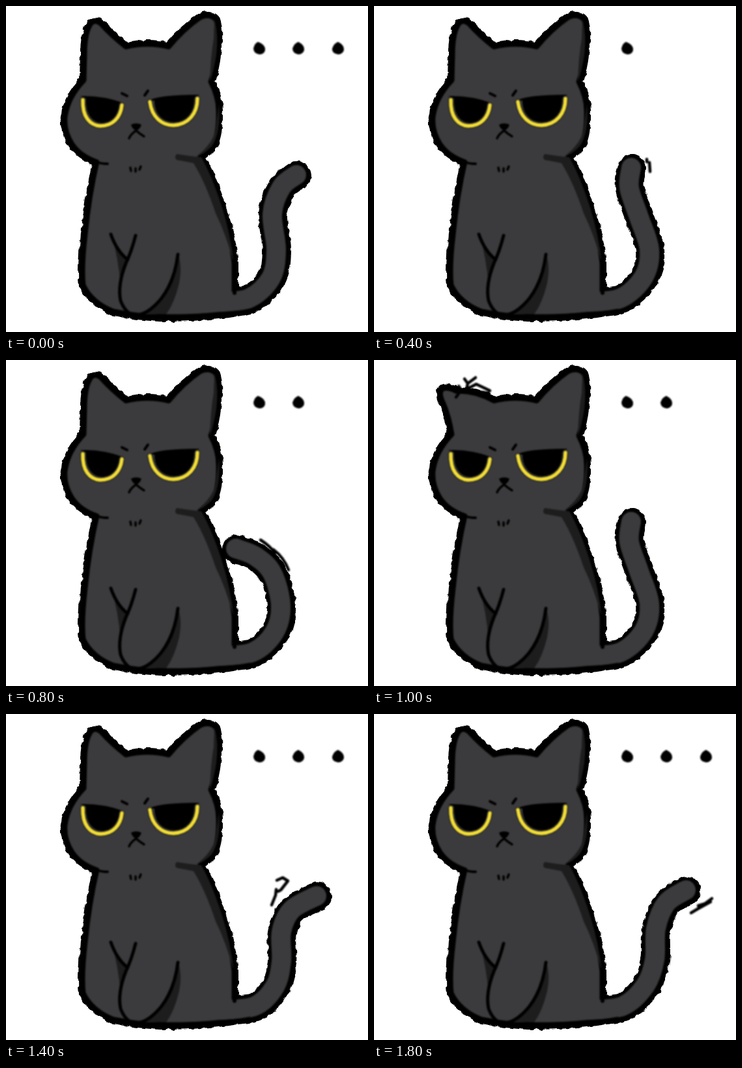
An HTML page for the animation above (2000 ms loop, 556x500 px).

```html
<!DOCTYPE html>
<html lang="en">
<head>
<meta charset="utf-8">
<title>Grumpy cat</title>
<style>
html, body { margin: 0; width: 100%; height: 100%; overflow: hidden; background: #fff; }
svg { display: block; width: 100vw; height: 100vh; }
.line { fill: none; stroke: #000; stroke-linecap: round; stroke-linejoin: round; }
.shade { fill: #1d1d1e; }
</style>
</head>
<body>
<svg viewBox="0 0 556 500">
  <defs>
    <filter id="rough" filterUnits="userSpaceOnUse" x="0" y="0" width="556" height="500" color-interpolation-filters="sRGB">
      <feTurbulence type="fractalNoise" baseFrequency=".13" numOctaves="1" seed="4"/>
      <feDisplacementMap in="SourceGraphic" scale="7" xChannelSelector="R" yChannelSelector="G"/>
    </filter>
    <filter id="soft" filterUnits="userSpaceOnUse" x="0" y="0" width="556" height="500" color-interpolation-filters="sRGB">
      <feGaussianBlur stdDeviation="1"/>
    </filter>
  </defs>

  <g filter="url(#rough)">
    <path class="tail line" stroke-width="44"/>
    <path class="body" stroke="#000" stroke-width="14" stroke-linejoin="round"/>
  </g>

  <g filter="url(#soft)">
    <path class="body" fill="#3b3b3d" stroke="#000" stroke-width="7" stroke-linejoin="round"/>
    <path class="tail line" style="stroke:#3b3b3d" stroke-width="30" transform="translate(-1 -1)"/>

    <!-- shading -->
    <path class="shade" d="M262 227Q280 230 300 232Q316 260 331 306Q345 350 350 395Q338 350 322 318Q306 270 288 241Q274 238 262 236Q258 232 262 227Z"/>
    <path class="shade" d="M320 20Q327 45 323 75Q319 100 313 117Q314 80 319 50Z"/>
    <path class="shade" d="M327 150Q330 195 316 215Q306 226 292 231Q317 212 322 190Z"/>
    <path class="shade" d="M264 380Q271 398 266 425Q259 455 246 473L214 473Q252 440 264 380Z"/>
    <path class="shade" d="M163 354Q171 380 187 391Q179 408 176 428Q172 385 163 354Z"/>
    <path class="line" d="M232 476Q320 478 374 468" stroke-width="7"/>

    <!-- legs and chin -->
    <g class="line" stroke-width="5">
      <path d="M161 350Q170 376 187 389M199 352Q193 376 184 395Q171 428 176 452Q181 466 192 473Q206 477 222 465Q257 438 264 381"/>
      <path d="M350 392L351 440" stroke-width="6"/>
      <path d="M138 239Q146 242 156 242" stroke-width="4"/>
      <path d="M191 248L192 253M199 249L199 254M207 246L205 251" stroke-width="3.5"/>
    </g>

    <!-- face -->
    <g id="open">
      <path d="M114 138Q150 137 181 149L174 152C172 169 162 179 147 179C133 179 122 166 123 142Z"/>
      <path d="M217 146Q232 136 297 136L289 142C289 166 276 178 258 178C242 178 228 167 228 145Z"/>
      <g class="line">
        <g id="rims" style="stroke:#29292a" stroke-width="9">
          <path d="M118 144C117 170 129 183 145 184C164 184 176 171 178 152"/>
          <path d="M221 147C224 171 240 183 257 183C280 182 294 165 294 142"/>
        </g>
        <use href="#rims" id="gold"/>
      </g>
    </g>
    <path id="shut" class="line" d="M109 163Q145 165 179 163M218 162Q258 165 291 157" stroke-width="4.5"/>
    <path class="line" d="M178 134L186 138M213 137L218 130" stroke-width="4"/>
    <path d="M192 182Q200 178 208 182Q206 189 200 191Q194 189 192 182Z"/>
    <path class="line" d="M189 203Q192 196 200 191Q205 196 212 200" stroke-width="3.5"/>

    <path id="marks" class="line" stroke-width="4.5"/>
    <g id="dots">
      <path d="M387 55Q399 59 398 68Q396 75 388 74Q380 72 380 65Q382 57 387 55Z"/>
      <path d="M449 55Q459 60 458 68Q455 75 448 74Q440 72 440 65Q443 57 449 55Z"/>
      <path d="M510 55Q520 60 519 68Q516 75 509 74Q500 72 501 65Q504 57 510 55Z"/>
    </g>
  </g>
</svg>
<script>
const $ = s => document.querySelector(s);
const setPath = (s, d) => document.querySelectorAll(s).forEach(e => e.setAttribute('d', d));

// the gold rims sit on their dark edge
const gold = $('#rims').cloneNode(true);
gold.id = 'gold';
gold.style.stroke = '#f5df35';
gold.setAttribute('stroke-width', 5.5);
$('#gold').replaceWith(gold);

// tail centre lines, from the base to the tip
const rest = [[375,449],[408,418],[416,375],[410,320],[424,279],[447,260]];
const up = [[380,449],[415,417],[424,375],[408,325],[393,280],[396,249]];
const curl = [[380,449],[413,419],[423,378],[410,328],[384,302],[354,290]];
const out = [[383,449],[414,419],[424,380],[424,335],[440,301],[478,280]];
const flat = [[383,449],[417,417],[430,380],[438,335],[454,309],[482,295],[517,295]];
const back = [[383,449],[418,417],[432,378],[434,330],[450,291],[480,271]];
const mid = (a, b) => a.map((p, i) => [(p[0] + b[i][0]) / 2, (p[1] + b[i][1]) / 2]);

const STEP = 200;
const poses = [
  { tail: rest, dots: 3 },
  { tail: mid(rest, up), dots: 0, shut: true },
  { tail: up, dots: 1, marks: 'M419 235L419 239M423 240L424 254' },
  { tail: mid(up, curl), dots: 1, bent: true },
  { tail: curl, dots: 2, marks: 'M391 276Q405 285 413 296M411 291Q426 302 434 322' },
  { tail: up, dots: 2, bent: true },
  { tail: mid(up, out), dots: 3, shut: true },
  { tail: out, dots: 3, marks: 'M416 255L425 251L433 256L422 270L418 272M415 269L414 278L408 293' },
  { tail: flat, dots: 3, shut: true },
  { tail: back, dots: 3, marks: 'M519 283L508 291L498 294M517 288L497 299L487 305' }
];

// smooth curve through the points
function curve(list) {
  const p = [[330,455], ...list];
  let d = 'M' + p[0];
  for (let i = 0; i < p.length - 1; i++) {
    const a = p[i - 1] || p[i], b = p[i], c = p[i + 1], e = p[i + 2] || c;
    const c1 = b.map((v, k) => v + (c[k] - a[k]) / 6);
    const c2 = c.map((v, k) => v - (e[k] - b[k]) / 6);
    d += `C${c1} ${c2} ${c}`;
  }
  return d;
}

const ear = 'M120 114L121 75Q121 42 130 28Q136 20 145 27Q162 46 184 63';
const bentEar = 'M120 114Q115 85 107 67Q99 50 105 45Q112 41 126 48Q156 47 184 63';
const earMarks = 'M126 57L134 46L130 40M139 29L144 36L156 27M144 36L142 45L157 37L178 47M150 47L176 51';
const outline =
  'Q217 55 250 63Q272 36 298 18Q313 11 322 21Q328 36 323 75Q320 100 314 116' +
  'Q326 140 326 160Q327 195 318 213Q310 224 298 232Q315 258 330 306Q346 350 350 395' +
  'L350 470Q300 477 235 477Q200 475 165 468Q132 455 119 428Q116 400 122 350' +
  'Q128 290 140 239Q114 230 102 212Q89 192 91 170Q95 140 120 114Z';

let shown = -1;
function draw(now) {
  const n = Math.floor(now / STEP) % poses.length;
  if (n === shown) return;
  const p = poses[shown = n];
  setPath('.tail', curve(p.tail));
  setPath('.body', (p.bent ? bentEar : ear) + outline);
  setPath('#marks', p.bent ? earMarks : p.marks || '');
  $('#open').style.display = p.shut ? 'none' : '';
  $('#shut').style.display = p.shut ? '' : 'none';
  [...$('#dots').children].forEach((e, i) => e.style.display = i < p.dots ? '' : 'none');
}

const start = performance.now();
function tick() {
  draw(performance.now() - start);
  requestAnimationFrame(tick);
}
tick();
</script>
</body>
</html>
```
